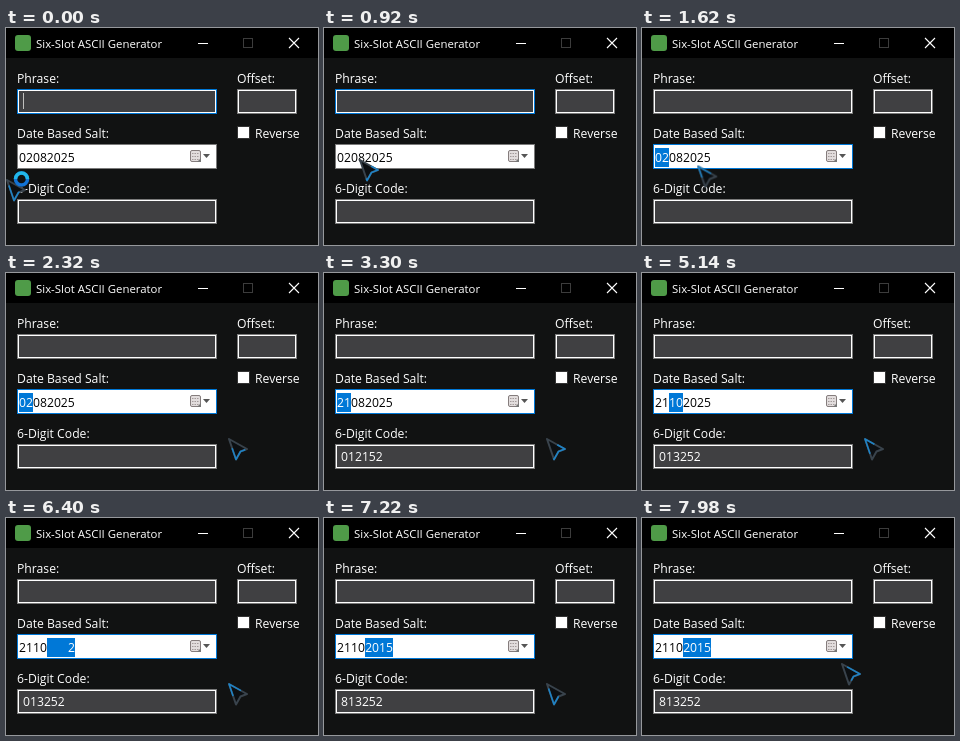
Recreate the animation shown at these times as an HTML page. Size 312 by 217 pixels, loop 8 s.

```html
<!DOCTYPE html>
<html lang="en">
<head>
<meta charset="utf-8">
<title>Six-Slot ASCII Generator</title>
<style>
  html, body { margin: 0; width: 100%; height: 100%; overflow: hidden; background: #111; }
  svg { display: block; width: 100vw; height: 100vh; }
  text { font: 12.2px "Open Sans", "Noto Sans", sans-serif; fill: #fff; white-space: pre; }
  .title { font-size: 11.4px; }
  .dark { fill: #000; }
  .crisp { shape-rendering: crispEdges; }
  .edge { stroke: #7a7a7a; }
  .edge.focused { stroke: #0078d7; }
  #cursor { animation: travel 8s infinite; }
  #busy { animation: busy 8s step-end infinite; }
  #spin { transform-origin: 15.5px 0; animation: spin 1s linear infinite; }
  #caret { animation: blink 8s step-end infinite; }
  #glow { stroke-dasharray: 45 55; animation: shimmer 1.2s linear infinite; }
  @keyframes travel {
    0% { transform: translate(0, 151px); animation-timing-function: ease-in-out; }
    4.5% { transform: translate(250px, 176px); animation-timing-function: ease-in-out; }
    10.5%, 18.5% { transform: translate(35px, 131px); animation-timing-function: ease-in; }
    20.5% { transform: translate(60px, 139px); animation-timing-function: ease-out; }
    26.5%, 94% { transform: translate(222px, 165px); animation-timing-function: ease-in-out; }
    95.5% { transform: translate(225px, 164px); animation-timing-function: ease-in-out; }
    99.5%, 100% { transform: translate(199px, 145px); }
  }
  @keyframes busy { 0% { opacity: 1; } 5% { opacity: 0; } }
  @keyframes blink { 0% { opacity: 1; } 5.6% { opacity: 0; } 12.2% { opacity: 1; } 15% { opacity: 0; } }
  @keyframes spin { to { transform: rotate(360deg); } }
  @keyframes shimmer { from { stroke-dashoffset: 55; } to { stroke-dashoffset: -45; } }
</style>
</head>
<body>
<svg viewBox="0 0 312 217" preserveAspectRatio="none">
  <rect width="312" height="217" fill="#111212"/>
  <rect width="312" height="30" fill="#000"/>
  <rect x="9" y="7" width="16" height="16" rx="3" fill="#4f9b48"/>
  <text class="title" x="30" y="20">Six-Slot ASCII Generator</text>
  <g class="crisp" fill="none">
    <path d="M192 15.5h10" stroke="#fff"/>
    <rect x="237.5" y="10.5" width="9" height="9" stroke="#3c3c3c"/>
  </g>
  <path d="M283 10l10 10M293 10l-10 10" stroke="#fff" stroke-width="1.1"/>

  <text x="11" y="55">Phrase:</text>
  <text x="231" y="55">Offset:</text>
  <text x="11" y="110">Date Based Salt:</text>
  <text x="249" y="110">Reverse</text>
  <text x="11" y="165">6-Digit Code:</text>

  <g id="fields" class="crisp"></g>
  <path id="caret" class="crisp" d="M17.5 65v16" stroke="#bfbfbd"/>
  <rect class="crisp" x="231.5" y="98.5" width="12" height="12" fill="#fff" stroke="#333"/>

  <rect id="selection" class="crisp" y="120" height="19" fill="#0078d7"/>
  <text id="before" class="dark" x="13" y="134"></text>
  <text id="picked" text-anchor="end" y="134"></text>
  <text id="after" class="dark" y="134"></text>
  <g>
    <rect x="184.5" y="122.5" width="10" height="11" rx="1.5" fill="#e2dddd" stroke="#857d7d"/>
    <path d="M186 125.5h7M186 128.5h7M186 131.5h7" stroke="#a39b9b" stroke-dasharray="1.5 1"/>
    <path d="M195 130v4h-4z" fill="#777"/>
    <path d="M197 126h7l-3.5 4z" fill="#555"/>
  </g>
  <text id="code" x="17" y="188"></text>

  <g id="cursor" stroke-linejoin="round">
    <path d="M1 1L19 11L12.5 13.5L8 21.500Z" fill="#0c0f12" stroke="#39434c" stroke-width="2"/>
    <path id="glow" pathLength="100" d="M1 1L19 11L12.500 13.500L8 21.500Z" fill="none" stroke="#1f82c4" stroke-width="1.600"/>
    <g id="busy" fill="none" stroke-width="3.5">
      <circle cx="15.5" r="6" stroke="#1273d6"/>
      <path id="spin" d="M9.500 0a6 6 0 0 1 12 0" stroke="#22b8ea"/>
    </g>
  </g>
</svg>
<script>
  const LOOP = 8000, DIGIT = 7, LEFT = 13;
  const $ = id => document.getElementById(id);

  // Themed edit box: outer edge, white inner line, filled interior
  const field = (id, x, y, w, fill = '#404042') =>
    `<rect id="${id}" class="edge" x="${x + .5}" y="${y + .5}" width="${w - 1}" height="24" fill="none"/>
     <rect x="${x + 1.5}" y="${y + 1.5}" width="${w - 3}" height="22" fill="${fill}" stroke="#fff"/>`;
  $('fields').innerHTML =
    field('phraseEdge', 11, 61, 200) + field('offsetEdge', 231, 61, 60) +
    field('dateEdge', 11, 116, 200, '#fff') + field('codeEdge', 11, 171, 200);

  // start time, date text, selected range, code
  const steps = [
    [0, '02082025', 0, 0, ''],
    [1200, '02082025', 0, 2, ''],
    [2780, ' 2082025', 0, 2, ''],
    [3080, '21082025', 0, 2, '012152'],
    [3640, '21082025', 2, 4, '012152'],
    [4220, '21 12025', 2, 4, '012152'],
    [4560, '21102025', 2, 4, '013252'],
    [5360, '21102025', 4, 8, '013252'],
    [6260, '2110   2', 4, 8, '013252'],
    [6600, '2110  20', 4, 8, '013252'],
    [6880, '2110 201', 4, 8, '013252'],
    [7160, '21102015', 4, 8, '813252']
  ];
  let shown;

  function show([, date, from, to, code]) {
    const dateFocused = to > 0, end = LEFT + to * DIGIT;
    $('before').textContent = date.slice(0, from);
    $('picked').textContent = date.slice(from, to).trim();
    $('picked').setAttribute('x', end);
    $('after').textContent = date.slice(to);
    $('after').setAttribute('x', end);
    $('selection').setAttribute('x', LEFT + from * DIGIT);
    $('selection').setAttribute('width', (to - from) * DIGIT);
    $('dateEdge').classList.toggle('focused', dateFocused);
    $('phraseEdge').classList.toggle('focused', !dateFocused);
    $('code').textContent = code;
  }

  function tick() {
    const time = performance.now() % LOOP;
    const step = steps.filter(s => s[0] <= time).pop();
    if (step !== shown) show(shown = step);
    requestAnimationFrame(tick);
  }
  tick();
</script>
</body>
</html>
```
